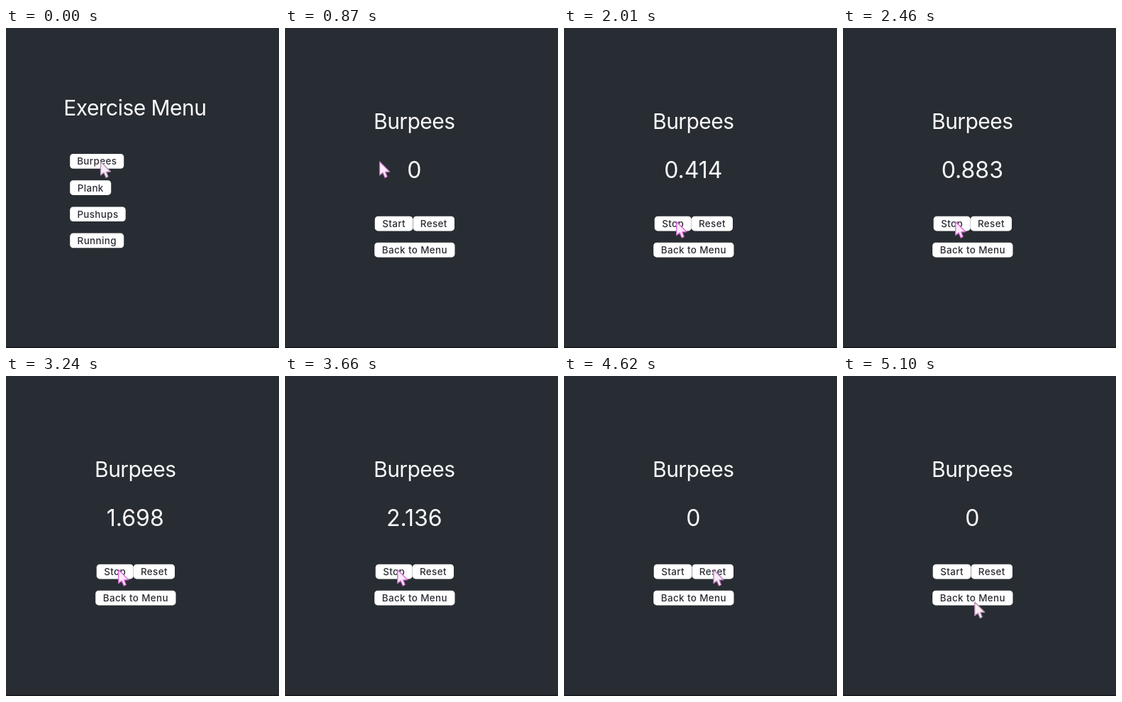
An HTML page for the animation above (5.13 s loop, 385x450 px).

```html
<!DOCTYPE html>
<html lang="en">
<head>
<meta charset="utf-8">
<title>Exercise Menu</title>
<style>
  html, body { margin: 0; width: 100%; height: 100%; overflow: hidden; background: #282d33; }
  svg { display: block; width: 385px; height: 450px; }
  text { font-family: Inter, "Liberation Sans", sans-serif; text-anchor: middle; }
  .title, .time { font-size: 30px; letter-spacing: -.55px; fill: #fafafa; }
  .time { font-size: 32px; letter-spacing: 0; }
  .button rect { fill: #fff; }
  .button text { font-size: 13.4px; font-weight: 450; letter-spacing: .38px; fill: #2b2d33; }
</style>
</head>
<body>
<svg viewBox="0 0 385 450">
  <rect width="385" height="450" fill="#282d33"/>
  <path d="M0 449.2H385" stroke="#17181c" stroke-width="1.6"/>
  <g id="menu"><text class="title" x="181.8" y="123">Exercise Menu</text></g>
  <g id="workout">
    <text class="title" x="182.3" y="142">Burpees</text>
    <text class="time" id="time" x="182.3" y="211.3"></text>
  </g>
  <g id="idle"></g>
  <g id="running"></g>
  <path id="cursor" d="M0 0V19L4.5 15.5L7.5 22.5L10.5 21L8 14.5L14 14Z" stroke-width="1.3" stroke-linejoin="round"/>
</svg>
<script>
const LOOP = 5130, STEP = 30;
const OPEN = 330, START = 1613.4, STOP = 3774.5, RESET = 4350;
const RATE = 1.0439; // stopwatch milliseconds per loop millisecond
const MOVE = 380;    // duration of each cursor move
const $ = id => document.getElementById(id);

function button(group, label, x, y, width) {
  $(group).insertAdjacentHTML('beforeend',
    `<g class="button"><rect x="${x}" y="${y}" width="${width}" height="20.7" rx="4.5"/>
     <text x="${x + width / 2}" y="${y + 15.3}">${label}</text></g>`);
}

[['Burpees', 76], ['Plank', 58], ['Pushups', 78.5], ['Running', 76]]
  .forEach(([label, width], i) => button('menu', label, 90.2, 177 + i * 37.2, width));
button('workout', 'Back to Menu', 126.2, 301.7, 113.3);
button('idle', 'Start', 126.7, 264.7, 53.6);
button('idle', 'Reset', 180.6, 264.7, 58.4);
button('running', 'Stop', 127.7, 264.7, 52);
button('running', 'Reset', 179.8, 264.7, 58.2);

// Cursor stops: arrival time and place
const stops = [
  { at: 0, x: 133.5, y: 188 },
  { at: 1530, x: 158.7, y: 272.5 },
  { at: 4110, x: 211, y: 272.5 },
  { at: 5100, x: 185.8, y: 318 }
];

function cursorAt(t) {
  let { x, y } = stops[0];
  for (const stop of stops.slice(1)) {
    const u = Math.min(1, Math.max(0, (t - stop.at) / MOVE + 1));
    const eased = u * u * (3 - 2 * u);
    x += (stop.x - x) * eased;
    y += (stop.y - y) * eased;
  }
  return [x, y];
}

const show = (id, visible) => $(id).setAttribute('visibility', visible ? 'visible' : 'hidden');

function draw(t) {
  const open = t >= OPEN, running = t >= START && t < STOP;
  show('menu', !open);
  show('workout', open);
  show('running', running);
  show('idle', open && !running);

  const counting = t >= START && t < RESET;
  $('time').textContent = counting ? Math.floor((Math.min(t, STOP) - START) * RATE) / 1000 : 0;

  const glow = Math.sin(Math.PI * t / LOOP), cursor = $('cursor');
  cursor.setAttribute('transform', `translate(${cursorAt(t)})`);
  cursor.setAttribute('stroke', `hsl(302, ${20 + 40 * glow}%, 62%)`);
  cursor.setAttribute('fill', `hsl(306, ${40 + 50 * glow}%, 95%)`);
}

const begin = performance.now();
function tick() {
  const t = (performance.now() - begin) % LOOP;
  draw(Math.floor(t / STEP) * STEP);
  requestAnimationFrame(tick);
}
tick();
</script>
</body>
</html>
```
